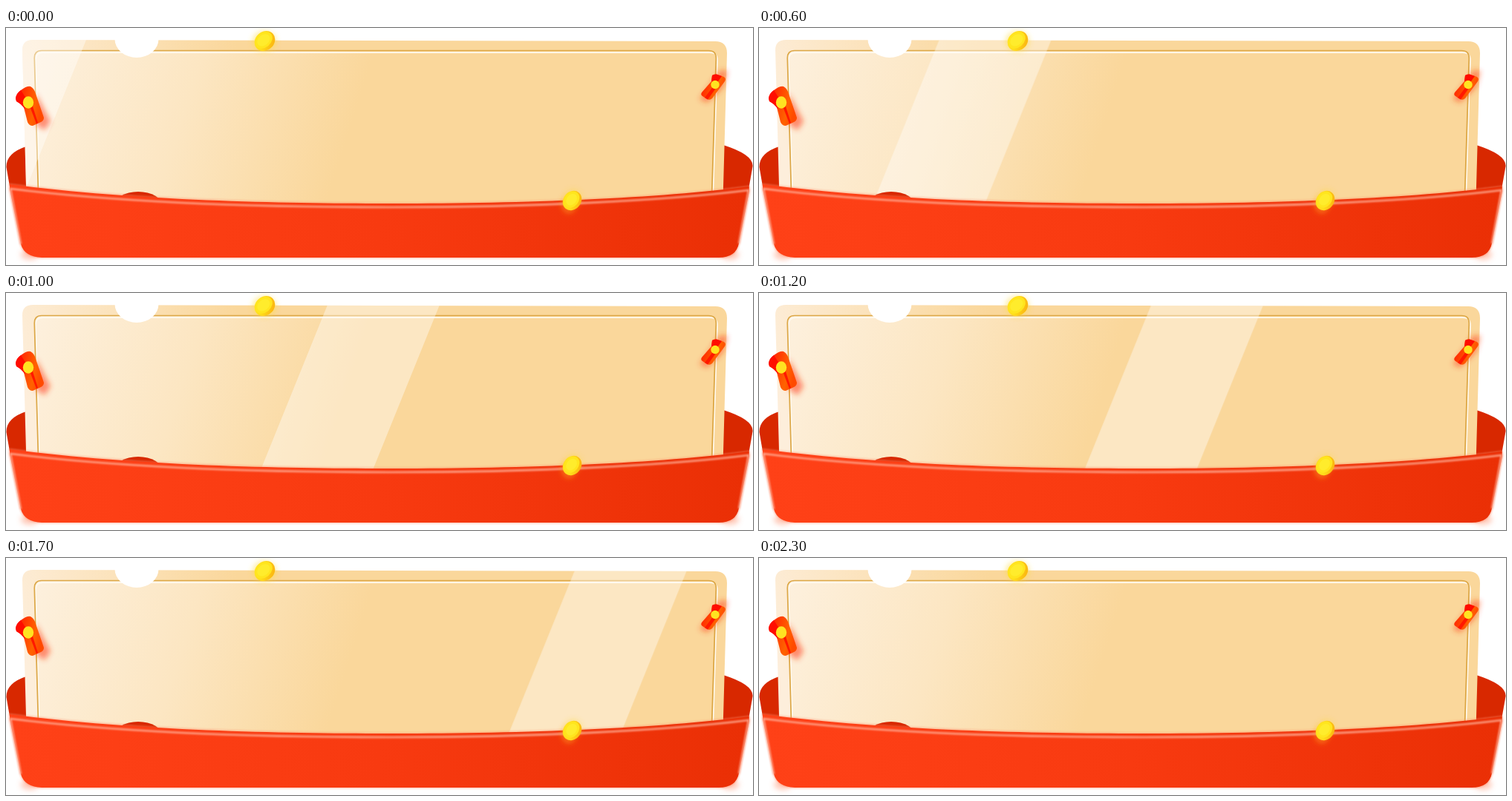
Animation of 1006 by 320 pixels, one loop 4.8 s. Source, as an HTML page:

```html
<!DOCTYPE html>
<html lang="en">
<head>
<meta charset="utf-8">
<title>Red pocket banner</title>
<style>
  html, body { margin: 0; width: 100%; height: 100%; overflow: hidden; background: #fff; }
  svg { display: block; width: 1006px; height: 320px; }
</style>
</head>
<body>
<svg viewBox="0 0 1006 320">
  <defs>
    <linearGradient id="paper" gradientUnits="userSpaceOnUse" x1="45" y1="14" x2="460" y2="146">
      <stop offset="0" stop-color="#fdf0dd"/>
      <stop offset=".5" stop-color="#fce6c2"/>
      <stop offset="1" stop-color="#fad79b"/>
    </linearGradient>
    <linearGradient id="rim" gradientUnits="userSpaceOnUse" x1="20" y1="120" x2="310" y2="20">
      <stop offset="0" stop-color="#fdeedb"/>
      <stop offset="1" stop-color="#fad79b"/>
    </linearGradient>
    <linearGradient id="front">
      <stop offset="0" stop-color="#ff4117"/>
      <stop offset=".5" stop-color="#f83a10"/>
      <stop offset="1" stop-color="#ea2f05"/>
    </linearGradient>
    <linearGradient id="packet" x1="0" y1="0" x2="1" y2=".3">
      <stop offset="0" stop-color="#ff1400"/>
      <stop offset=".75" stop-color="#ff6300"/>
      <stop offset="1" stop-color="#ff4a00"/>
    </linearGradient>
    <linearGradient id="gold" x1="0" y1="0" x2="1" y2="1">
      <stop offset=".4" stop-color="#ffde1c"/>
      <stop offset="1" stop-color="#f9a80c"/>
    </linearGradient>
    <filter id="soft" x="-100%" y="-100%" width="300%" height="300%"><feGaussianBlur stdDeviation="3.5"/></filter>
    <filter id="faint" x="-5%" y="-20%" width="110%" height="140%"><feGaussianBlur stdDeviation="1.1"/></filter>
    <path id="card" d="M36 16L955 18Q971 18 971 34L965 250H28L22 30Q22 16 36 16Z"/>
    <path id="frame" d="M43.5 222L38.3 41Q38 30.5 48 30.5H946Q956.500 30.5 956.300 41L950.500 226"/>
    <path id="pocket" d="M5 211C180 234 380 237 520 237C700 237 880 230 1000.500 214L1001 220L987 291Q983 310 960 310H48Q25 309 20 292L5 217Z"/>
    <clipPath id="inCard"><use href="#card"/></clipPath>
  </defs>

  <path fill="#d82800" d="M27 160Q0 169 .5 188L6 220L40 235H960L1000 218L1005.500 187Q1007 171 966 158Z"/>

  <use href="#card" fill="url(#rim)"/>
  <path fill="url(#paper)" d="M43.500 250L38.300 41Q38 30.500 48 30.500H946Q956.500 30.500 956.300 41L950 250Z"/>
  <g fill="none">
    <use href="#frame" x="1.700" y="2.600" stroke="#fffaf0" stroke-width="1.600"/>
    <use href="#frame" stroke="#dca746" stroke-width="1.700"/>
  </g>
  <g clip-path="url(#inCard)">
    <path id="shine" fill="#fff" fill-opacity=".4" d="M-43 16H108L17.500 240H-133.500Z"/>
  </g>
  <ellipse cx="176" cy="15" rx="29.500" ry="25" fill="#fff"/>
  <ellipse cx="178" cy="241" rx="33" ry="20" fill="#d82800"/>

  <g filter="url(#soft)" fill="#ff7a50" fill-opacity=".4">
    <ellipse cx="32" cy="306" rx="12" ry="7"/>
    <ellipse cx="975" cy="306" rx="12" ry="7"/>
  </g>
  <use href="#pocket" fill="none" stroke="#ff8a68" stroke-opacity=".5" stroke-width="2.500" filter="url(#faint)"/>
  <use href="#pocket" fill="url(#front)"/>
  <path d="M20 292L6 217C180 239 380 242 520 242C700 242 880 234 1000 219L987 291" fill="none" stroke="#ffb199" stroke-opacity=".85" stroke-width="2.600" filter="url(#faint)"/>

  <!-- packets -->
  <path d="M40 88L60 126L52 138L40 130Z" fill="#ff3c14" fill-opacity=".55" filter="url(#soft)"/>
  <path fill="url(#packet)" d="M13 95Q14 88 20 84Q28 78 33 79Q37 81 39 86L51 121Q51 125 47 127L36 132Q31 132 29 127L24 107Q20 102 14 99Z"/>
  <path fill="#ff0d00" d="M13 95Q14 88 20 84L31 101L25 109Q20 102 14 99Z"/>
  <path fill="#ff1800" d="M31 103L36 106L43 128L41 129.500Z"/>
  <ellipse cx="30" cy="100.500" rx="7.200" ry="8.200" fill="#ffe321"/>

  <path d="M962 57L972 58L966 80L944 101L934 96Z" fill="#ff3c14" fill-opacity=".5" filter="url(#soft)"/>
  <path fill="url(#packet)" d="M951 64Q953 62 957 62.500L967 66Q970 68 968 72L951 95Q948 98 944 96L938 92Q935 90 937 87L950 72Z"/>
  <path fill="#ff0d00" d="M951 64Q953 62 957 62.500L964 65L956 76L950 72Z"/>
  <path fill="#ff1800" d="M953 78L957 80L945 96.500L941 94Z"/>
  <circle cx="955" cy="76.500" r="5.700" fill="#ffe321"/>

  <!-- coins -->
  <ellipse cx="348" cy="18" rx="16" ry="14" fill="#ffdc3c" fill-opacity=".5" filter="url(#soft)"/>
  <g transform="translate(348.500 17.500) rotate(-40)">
    <ellipse rx="14.600" ry="12.500" fill="url(#gold)"/>
    <ellipse cx="-.5" cy="-2" rx="13" ry="10" fill="#ffe51e"/>
    <ellipse cx="-.5" cy="-2" rx="9.500" ry="7" fill="#ffec2c"/>
  </g>
  <ellipse cx="758" cy="238" rx="10" ry="12" fill="#ffa51e" fill-opacity=".5" filter="url(#soft)"/>
  <ellipse cx="764" cy="229" rx="11" ry="11" fill="#ffdc3c" fill-opacity=".45" filter="url(#soft)"/>
  <g transform="translate(762.500 233) rotate(-50)">
    <ellipse rx="14" ry="11.800" fill="url(#gold)"/>
    <ellipse cx=".5" cy="-1.500" rx="12" ry="9.500" fill="#ffe51e"/>
    <ellipse cx=".5" cy="-1.500" rx="8.500" ry="6.500" fill="#ffec2c"/>
  </g>
</svg>
<script>
  const LOOP = 4800, TICK = 100, STEPS = 23, STRIDE = 47.6;
  const end = `translateX(${STEPS * STRIDE}px)`;
  // the shine jumps once per tick, then rests off the card
  document.getElementById('shine').animate([
    { transform: 'translateX(0px)', easing: `steps(${STEPS}, end)` },
    { transform: end, offset: STEPS * TICK / LOOP },
    { transform: end }
  ], { duration: LOOP, iterations: Infinity });
</script>
</body>
</html>
```
